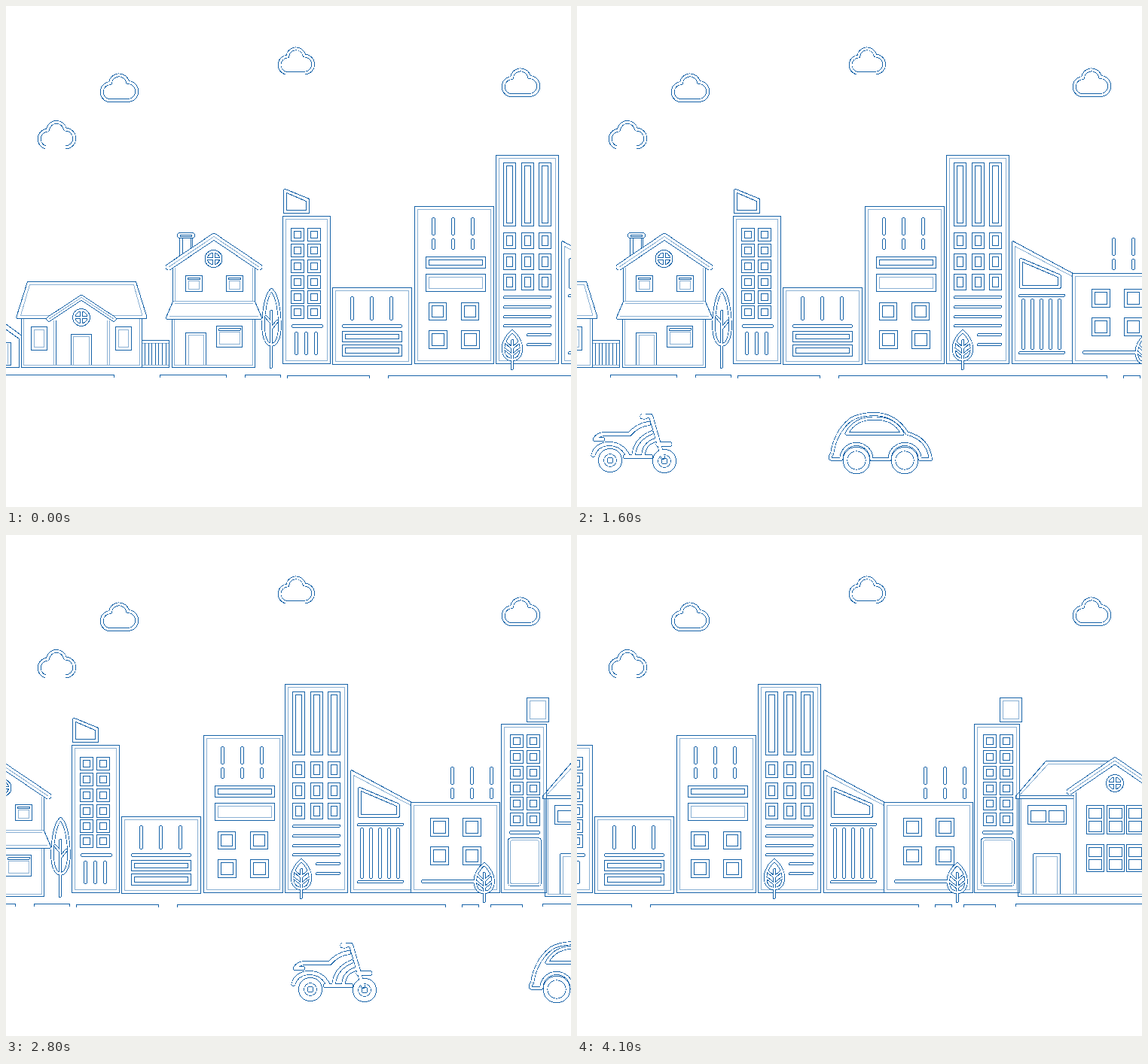
Write an HTML page that moves like this. It is 750x666 px and loops after 4.2 s.

```html
<!DOCTYPE html>
<html lang="en">
<head>
<meta charset="utf-8">
<title>Town street</title>
<style>
  html, body { margin: 0; width: 100%; height: 100%; overflow: hidden; background: #fff; }
  svg { display: block; width: 750px; height: 666px; shape-rendering: crispEdges; }
  svg * { stroke-linejoin: round; }
  .ink { fill: none; stroke: #1763a8; stroke-width: 1; }
  .thin { fill: none; stroke: #8bb1d4; stroke-width: 1; }
  .paper { fill: none; stroke: #fff; }
  .solid { fill: #fff; }
  .round { stroke-linecap: round; }
</style>
</head>
<body>
<svg viewBox="0 0 750 666">
  <g id="sky"></g>
  <g id="town"></g>
  <g id="car"></g>
  <g id="bike"></g>
</svg>
<script>
const LOOP = 4200, STEP = 100;
const $ = id => document.getElementById(id);

// --- drawing helpers: corners are the first and last pixel of a shape ---
const path = (d, cls = 'ink') => `<path class="${cls}" d="${d}"/>`;
const rect = (x0, y0, x1, y1, r = 1, cls = 'ink') =>
  `<rect class="${cls}" x="${x0 + .5}" y="${y0 + .5}" width="${x1 - x0}" height="${y1 - y0}" rx="${r}"/>`;
const box = (x0, y0, x1, y1, t = 4, r = 1) =>
  rect(x0, y0, x1, y1, r) + rect(x0 + t, y0 + t, x1 - t, y1 - t, r / 2, 'thin');
const pane = (x, y, w, h = w, t = 4) =>
  rect(x, y, x + w, y + h) + rect(x + t, y + t, x + w - t, y + h - t, 0);
const bar = (x0, y0, x1, y1) =>
  rect(x0, y0, x1, y1, Math.min(x1 - x0, y1 - y0) / 2);
const circle = (x, y, r, cls = 'ink') => `<circle class="${cls}" cx="${x}" cy="${y}" r="${r}"/>`;
const ring = (x, y, r) => `M${x - r} ${y}a${r} ${r} 0 1 1 ${2 * r} 0a${r} ${r} 0 1 1 ${-2 * r} 0Z`;
const grid = (xs, ys, f) => ys.map(y => xs.map(x => f(x, y)).join('')).join('');

// Contour of a set of thick strokes: parts are [width, path]
const contour = parts =>
  parts.map(([w, d]) => `<path class="ink round" style="stroke-width:${w}" d="${d}"/>`).join('') +
  parts.map(([w, d]) => `<path class="paper round" stroke-width="${w - 1.7}" d="${d}"/>`).join('');

const at = (x, y, body, s = 1) => `<g transform="translate(${x} ${y}) scale(${s})">${body}</g>`;

// --- parts ---
const cloud = contour([[4.8,
  'M13.5 35.5A11.7 11.7 0 0 1 16.5 12.6A11.6 11.6 0 0 1 39.5 11.5A12 12 0 0 1 40 35.5Z']]);

const porthole = (x, y) => circle(x, y, 11.5, 'ink solid') + circle(x, y, 8) +
  `<path class="ink" style="stroke-width:4" d="M${x - 7.5} ${y}h15M${x} ${y - 7.5}v15"/>` +
  `<path class="paper" stroke-width="2" d="M${x - 9} ${y}h18M${x} ${y - 9}v18"/>`;

const gable = (x, y, dx, dy, w) => {
  const d = `M${x - dx} ${y + dy}L${x} ${y}L${x + dx} ${y + dy}`;
  return `<path fill="#fff" d="${d}Z"/>` + contour([[w, d]]) + path(d, 'thin');
};

const leafTree = (x, y) => {
  const leaf = 'M0 2.5C7 8 12 17 12 25C12 35 7 40 0 40C-7 40 -12 35 -12 25C-12 17 -7 8 0 2.5Z';
  return at(x, y, `<path fill="#fff" d="${leaf}"/>` + contour([
    [4.4, leaf], [4, 'M0 15V52'],
    [3.6, 'M-9 17L0 25L9 17M-10 26L0 34L10 26']]));
};

const tallTree = () => {
  const leaf = 'M352.5 377.5C360 384 363.5 408 363.5 424C363.5 443 358 450 352.5 450.5' +
    'C347 450 341.5 443 341.5 424C341.5 408 345 384 352.5 377.5Z';
  return `<path fill="#fff" d="${leaf}"/>` + contour([[4.6, leaf],
    [4, 'M352 406V480M345 413L352 421M360 419L352 429']]);
};

const ground = (x0, x1, y = 491) => path(`M${x0 + .5} ${y + 4}v-2.5q0 -1 1 -1H${x1 - .5}q1 0 1 1v2.5`);

const dormer = x => rect(x, 358, x + 22, 379) + bar(x + 3, 361, x + 19, 363) +
  rect(x + 4, 365, x + 18, 376, 0, 'thin');

const sash = (x, y, h) => rect(x, y, x + 23, y + h) +
  rect(x + 3, y + 4, x + 20, y + h / 2 - 2) + rect(x + 3, y + h / 2 + 2, x + 20, y + h - 3);

// --- buildings ---
const cottage = () =>
  path('M0 423L20 437.5M0 430L17.5 442.5V480.5H0M0 447.5H6.5V477.5H0') +
  path('M2.5 449V476', 'thin') +
  path('M28.5 366.5H172.5L187 413.5Q187 415.5 185 415.5H15.5Q13.5 415 14 413Z') +
  path('M31.5 370.5H169.5L181 411.5H19.5Z', 'thin') +
  path('M20.5 416V480.5H180.5V416M66.5 418V477') +
  path('M23.5 416V477.5H177.5V416M63.5 418V477M134.5 418V477M137.5 418V477', 'thin') +
  rect(33, 426, 54, 457) + rect(37, 430, 50, 453, 0, 'thin') +
  rect(145, 426, 166, 457) + rect(149, 430, 162, 453, 0, 'thin') +
  path('M86.5 477V436.5H113.5V477') + path('M89.5 477V439.5H110.5V477', 'thin') +
  gable(100, 387.5, 43, 28.5, 7) + porthole(100, 414);

const fence = () => rect(180, 444, 216, 480) + path('M181 448.5H216M181 477.5H216', 'thin') +
  [0, 1, 2, 3, 4, 5, 6].map(i => path(`M${184.5 + Math.round(i * 4.6)} 448V477`)).join('');

const villa = () =>
  path('M230.5 308V334M247.5 308V322') + path('M234.5 308V331M245.5 308V323', 'ink') +
  rect(227, 301, 250, 308, 3.5) + bar(231, 304, 246, 306) +
  path('M221.5 348V393L212.5 414Q212.5 416.5 214 416.5H338Q340 416 339.5 414L330.5 393V348') +
  path('M224.5 348V392M327.5 348V392M222 392.5H330M224 395.5H328M217 412.5H335', 'thin') +
  path('M220.5 417V480.5H330.5V417') + path('M223.5 417V477.5H327.5V417', 'thin') +
  path('M238.5 477V434.5H265.5V477') + path('M242.5 477V437.5H262.5V477', 'thin') +
  rect(279, 425, 313, 453) + bar(282, 428, 311, 431) + rect(283, 433, 310, 449, 0, 'thin') +
  dormer(238) + dormer(292) +
  gable(276, 306.5, 60, 40.5, 9) + porthole(275.5, 336);

const flats = () =>
  path('M368.5 244.5Q369 243 371 243.5L401.5 256Q402.5 256.5 402.5 258V275.5H368.5Z') +
  path('M372.5 248.5L398.5 259.5V271.5H372.5Z') +
  box(367, 279, 430, 475) +
  grid([378, 400], [295, 316, 337, 358, 378, 398], (x, y) => pane(x, y, 17)) +
  bar(379, 423, 420, 427) +
  grid([383, 396, 409], [433], (x, y) => bar(x, y, x + 4, 463));

const shop = () => box(433, 374, 538, 476) +
  grid([457, 483, 509], [386], (x, y) => bar(x, y, x + 4, 417)) +
  bar(446, 423, 525, 427) + pane(446, 432, 79, 14, 4) + pane(446, 450, 79, 15, 4);

const office = () => box(542, 266, 647, 475) +
  grid([565, 591, 617], [0], x => bar(x, 281, x + 4, 304) + bar(x, 309, x + 4, 323)) +
  pane(557, 333, 79, 15) + box(557, 356, 636, 379) +
  pane(561, 394, 23) + pane(604, 394, 23) + pane(561, 431, 24) + pane(604, 431, 24);

const tower = () => box(650, 198, 733, 475) +
  grid([660, 684, 707], [208], (x, y) => pane(x, y, 16, 84)) +
  grid([660, 684, 707], [301, 329, 356], (x, y) => pane(x, y, 16, 21)) +
  grid([660], [385, 398, 411, 423], (x, y) => bar(x, y, 723, y + 3)) +
  grid([691], [435, 448], (x, y) => bar(x, y, 723, y + 3));

// Shares its right wall with the hall
const studio = () =>
  path('M817.5 355L739.5 313Q737.5 312 737.5 314V475.5H817.5') +
  path('M817.5 359.5L741.5 319.5V471.5H817.5', 'thin') +
  path('M747.5 337Q748 335 750 335.5L801 357Q802.5 358 802.5 360V373Q802.5 375.5 800 375.5H749.5Q747.5 375.5 747.5 373Z') +
  path('M751.5 340.5L798.5 360.5V371.5H751.5Z') +
  bar(746, 383, 807, 386) +
  grid([750, 762, 774, 786, 798], [389], (x, y) => bar(x, y, x + 4, 456)) +
  bar(746, 459, 807, 462);

const hall = () => box(817, 355, 935, 475) +
  grid([870, 896, 922], [0], x => bar(x, 308, x + 4, 331) + bar(x, 336, x + 4, 350)) +
  grid([843, 886], [376, 414], (x, y) => pane(x, y, 24)) +
  bar(831, 458, 905, 462);

const block = () => box(971, 216, 1000, 248) + box(937, 251, 997, 475) +
  grid([949, 971], [265, 286, 307, 328, 348, 369], (x, y) => pane(x, y, 17)) +
  bar(948, 393, 988, 397) + rect(946, 402, 990, 466, 4) + rect(949, 405, 987, 463, 3, 'thin');

const manor = () =>
  path('M995.5 350V480.5H1200') + path('M999.5 350V477.5H1200', 'thin') +
  path('M1115 300.5H1032.5L992.5 347Q991.5 350.5 994 350.5H1070') +
  path('M1112 304.5H1035.5L998.5 345', 'thin') + path('M998 346.5H1070') +
  rect(1008, 359, 1059, 384) +
  rect(1012, 366, 1032, 381) + rect(1036, 366, 1056, 381) +
  path('M1015.5 477V425Q1015.5 423.5 1017 423.5H1050Q1051.5 423.5 1051.5 425V477') +
  path('M1019.5 477V427.5H1047.5V477', 'thin') +
  path('M1072.5 342V477') + path('M1069.5 347V477', 'thin') +
  grid([1086, 1113, 1139], [0], x => sash(x, 359, 38) + sash(x, 411, 36)) +
  gable(1124, 300, 60, 41, 9) + porthole(1124, 330);

// --- vehicles ---
const car = contour([
  [5, 'M109 602.5H98Q94 600.5 98.5 595.5Q103 566 123 550Q135 542.5 155 542.5Q183 543 198 568' +
      'Q226 575 229.5 602.5H216'],
  [5, 'M110.8 602.5A20 20 0 0 1 151 602.5H175A20 20 0 0 1 215.2 602.5'],
  [5, 'M118 568.5H192Q182 548 155 548Q128 548 118 568.5Z'],
  [6.5, ring(131, 604, 15) + ring(195, 604, 15)]
]);

const bike = contour([
  [8, ring(44, 604, 12) + ring(116, 605, 12)],
  [8, 'M87.5 545.5H90'],
  [6, 'M90 545H98L114 600'],
  [7, 'M108 582.5H123'],
  [6, 'M24 575.5Q28 569.5 36 569H70Q80 557 95 555M24 576H34'],
  [6, 'M21.5 597Q25 584 40 582Q60 581 68 599'],
  [6, 'M64 599H98'],
  [5.5, 'M75 598Q77 576 99 567M88 597Q89 582 104 577']
]) + circle(44, 604, 4) + circle(116, 605, 4);

$('sky').innerHTML = at(122, 90, cloud) + at(39, 152.5, cloud) +
  at(358, 55, cloud, .96) + at(655, 83, cloud);

$('town').innerHTML = [
  ground(-10, 143, 490), ground(204, 292, 490), ground(317, 364, 490),
  ground(373, 482), ground(507, 863), ground(885, 907), ground(923, 965),
  ground(992, 1200, 490),
  cottage(), fence(), villa(), tallTree(), flats(), shop(), office(), tower(),
  leafTree(672, 430), studio(), hall(), block(), manor(), leafTree(914.7, 435)
].join('');
$('car').innerHTML = car;
$('bike').innerHTML = bike;

const shift = (id, x) => $(id).setAttribute('transform', `translate(${x} 0)`);

function draw(time) {
  const n = Math.floor((time % LOOP) / STEP);
  shift('town', -10 * n);
  shift('car', 30 * (n - 8));
  shift('bike', 30 * (n - 16));
}

function tick(now) {
  draw(now);
  requestAnimationFrame(tick);
}
draw(0);
requestAnimationFrame(tick);
</script>
</body>
</html>
```
